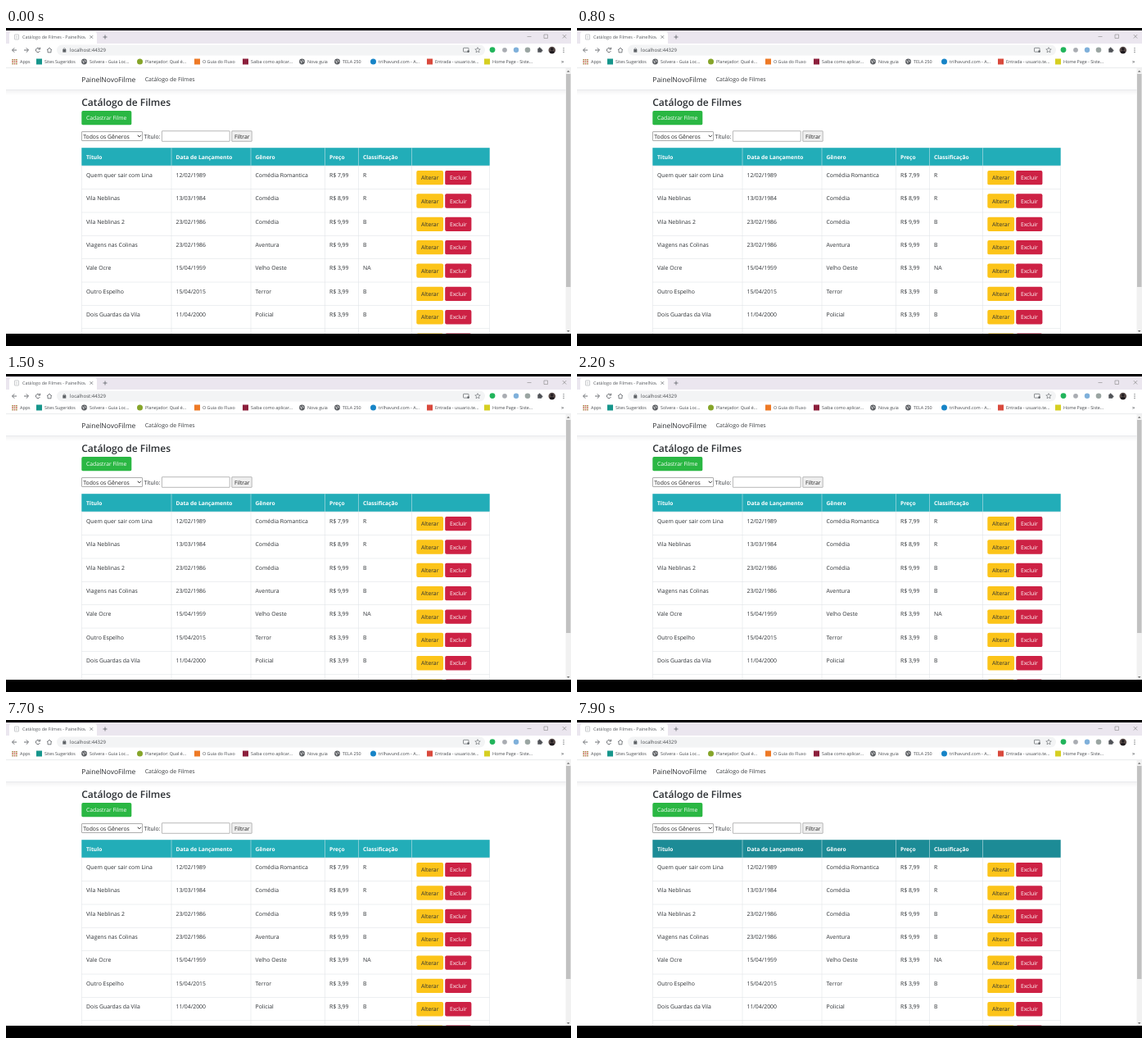
Animation of 690x388 px, one loop 8 s. Source, as an HTML page with a canvas:

```html
<!DOCTYPE html>
<html lang="pt-BR">
<head>
<meta charset="utf-8">
<title>Catálogo de Filmes</title>
<style>
html, body { margin: 0; width: 100%; height: 100%; overflow: hidden; background: #000; }
canvas { display: block; width: 690px; height: 388px; }
</style>
</head>
<body>
<canvas id="stage"></canvas>
<script>
const W = 690, H = 388, LOOP = 8000, DIM_AT = 7900;
const canvas = document.getElementById('stage');
const ctx = canvas.getContext('2d');
const ratio = window.devicePixelRatio || 1;
canvas.width = W * ratio;
canvas.height = H * ratio;
ctx.scale(ratio, ratio);
ctx.textRendering = 'geometricPrecision';

const INK = '#2b2f33', ICON = '#5f6367', BORDER = '#e1e4e8', FIELD = '#a6a6a6';
const COLUMNS = [92.5, 202, 299, 389.5, 430.5, 495.5, 590.5];
const HEADINGS = ['Título', 'Data de Lançamento', 'Gênero', 'Preço', 'Classificação'];
const ROW_TOP = 168, ROW_H = 28.35, PAGE_TOP = 3, PAGE_END = 373;
const FILMS = [
  ['Quem quer sair com Lina', '12/02/1989', 'Comédia Romantica', 'R$ 7,99', 'R'],
  ['Vila Neblinas', '13/03/1984', 'Comédia', 'R$ 8,99', 'R'],
  ['Vila Neblinas 2', '23/02/1986', 'Comédia', 'R$ 9,99', 'B'],
  ['Viagens nas Colinas', '23/02/1986', 'Aventura', 'R$ 9,99', 'B'],
  ['Vale Ocre', '15/04/1959', 'Velho Oeste', 'R$ 3,99', 'NA'],
  ['Outro Espelho', '15/04/2015', 'Terror', 'R$ 3,99', 'B'],
  ['Dois Guardas da Vila', '11/04/2000', 'Policial', 'R$ 3,99', 'B']
];
// x of icon, label, icon kind, icon colour
const BOOKMARKS = [
  [7, 'Apps', 'grid'],
  [37, 'Sites Sugeridos', 'square', '#16968c'],
  [92, 'Solvera - Guia Loc...', 'globe'],
  [160, 'Planejador: Qual é...', 'circle', '#86a52a'],
  [230, 'O Guia do Fluxo', 'square', '#ee7a26'],
  [289, 'Saiba como aplicar...', 'square', '#8c1f3c'],
  [358, 'Nova guia', 'globe'],
  [401, 'TELA 250', 'globe'],
  [445, 'trilhavund.com - A...', 'circle', '#1784c7'],
  [514, 'Entrada - usuario.te...', 'square', '#d94a3d'],
  [584, 'Home Page - Siste...', 'square', '#d6cf22']
];

function rect(x, y, w, h, color) {
  ctx.fillStyle = color;
  ctx.fillRect(x, y, w, h);
}

function round(x, y, w, h, r, fill, stroke, width = 0.7) {
  ctx.beginPath();
  ctx.roundRect(x, y, w, h, r);
  if (fill) { ctx.fillStyle = fill; ctx.fill(); }
  if (stroke) { ctx.strokeStyle = stroke; ctx.lineWidth = width; ctx.stroke(); }
}

function disc(x, y, r, color) {
  ctx.beginPath();
  ctx.arc(x, y, r, 0, Math.PI * 2);
  ctx.fillStyle = color;
  ctx.fill();
}

function line(points, color = ICON, width = 0.9) {
  ctx.beginPath();
  points.forEach(([x, y], i) => i ? ctx.lineTo(x, y) : ctx.moveTo(x, y));
  ctx.strokeStyle = color;
  ctx.lineWidth = width;
  ctx.stroke();
}

function arc(x, y, r, from, to, color = ICON, width = 0.9) {
  ctx.beginPath();
  ctx.arc(x, y, r, from, to);
  ctx.strokeStyle = color;
  ctx.lineWidth = width;
  ctx.stroke();
}

function text(str, x, y, size = 6.87, color = INK, weight = 400) {
  ctx.font = `${weight} ${size}px "Open Sans", "Noto Sans", sans-serif`;
  ctx.fillStyle = color;
  ctx.fillText(str, x, y);
}

function cross(x, y, r, color = ICON) {
  line([[x - r, y - r], [x + r, y + r]], color, 0.7);
  line([[x + r, y - r], [x - r, y + r]], color, 0.7);
}

function star(x, y, r) {
  const points = [];
  for (let i = 0; i <= 10; i++) {
    const a = i * Math.PI / 5 - Math.PI / 2, d = i % 2 ? r * 0.45 : r;
    points.push([x + d * Math.cos(a), y + d * Math.sin(a)]);
  }
  line(points, ICON, 0.6);
}

function tabStrip() {
  rect(0, PAGE_TOP, W, 17, '#ebe6ef');
  round(4, 4, 107, 18, [4, 4, 0, 0], '#fff');
  round(10.5, 8, 5, 6, 0.4, '#fff', '#a5a8ad', 0.6);
  line([[11.8, 10.2], [14.2, 10.2]], '#a5a8ad', 0.5);
  line([[11.8, 12], [14.2, 12]], '#a5a8ad', 0.5);
  ctx.save();
  ctx.beginPath();
  ctx.rect(19, 4, 78, 16);
  ctx.clip();
  text('Catálogo de Filmes - PainelNovo', 20, 13, 5.45, '#55585d');
  ctx.restore();
  cross(104.3, 11, 1.8);
  line([[118.5, 11], [123.5, 11]], ICON, 0.8);
  line([[121, 8.5], [121, 13.5]], ICON, 0.8);
  line([[636.5, 10.5], [641.5, 10.5]], '#888', 0.6);
  round(657, 8, 4.5, 4.5, 0, null, '#888', 0.6);
  cross(682, 10.3, 2.2, '#888');
}

function navIcons() {
  line([[13, 27], [7.8, 27]]);
  line([[10.2, 24.3], [7.5, 27], [10.2, 29.7]]);
  line([[22, 27], [27.2, 27]]);
  line([[24.8, 24.3], [27.5, 27], [24.8, 29.7]]);
  arc(39, 27, 2.6, 0.4, 5.5);
  line([[41.6, 23.7], [41.6, 26], [39.3, 26]]);
  line([[50, 27], [53, 24.2], [56, 27]]);
  line([[51, 26.5], [51, 29.8], [55, 29.8], [55, 26.5]], ICON, 0.8);
}

function toolbar() {
  rect(0, 19, W, 30, '#fff');
  navIcons();
  round(62, 20.5, 523, 13, 6.5, '#f3f4f5');
  rect(69.3, 26, 4, 3.6, ICON);
  arc(71.3, 26, 1.3, Math.PI, 0, ICON, 0.7);
  text('localhost:44329', 78, 29, 6, '#45484c');
  round(558.5, 24.3, 6.5, 4.8, 0.6, null, ICON, 0.7);
  disc(564.6, 28.6, 1.3, ICON);
  star(576, 27, 3.4);
  disc(594, 26.6, 3.4, '#21b45b');
  disc(609, 26.8, 2.9, '#a9acb2');
  disc(623, 26.8, 3.2, '#7fb0da');
  disc(637, 26.8, 3.3, '#9aa5a2');
  round(649.3, 25, 4.8, 4.8, 0.6, '#505358');
  disc(651.6, 24.8, 1.2, '#505358');
  disc(654.2, 27.4, 1.2, '#505358');
  avatar();
  for (const y of [24.6, 27, 29.4]) disc(681, y, 0.65, ICON);
}

function avatar() {
  ctx.save();
  ctx.beginPath();
  ctx.arc(666.8, 27, 4.3, 0, Math.PI * 2);
  ctx.clip();
  rect(662, 22, 10, 10, '#574a48');
  disc(666.8, 25.8, 1.8, '#201c20');
  disc(666.8, 31, 3.2, '#201c20');
  ctx.restore();
}

function bookmarkIcon(kind, x, color) {
  const cx = x + 3.5, cy = 41;
  if (kind === 'grid') {
    for (let i = 0; i < 9; i++)
      rect(x + 0.3 + (i % 3) * 2.4, 38 + Math.floor(i / 3) * 2.4, 1.6, 1.6, i % 2 ? '#c75a48' : '#a08a45');
  } else if (kind === 'globe') {
    disc(cx, cy, 3.4, '#5a5d61');
    line([[x + 1.2, 40], [x + 3.2, 41], [x + 2.6, 43]], '#fff', 0.8);
    line([[x + 4, 38.7], [x + 4.4, 40.2], [x + 6, 41]], '#fff', 0.7);
  } else if (kind === 'circle') {
    disc(cx, cy, 3.5, color);
  } else {
    rect(x, 37.5, 7, 7, color);
  }
}

function bookmarks() {
  for (const [x, label, kind, color] of BOOKMARKS) {
    bookmarkIcon(kind, x, color);
    text(label, x + 10, 43, 5.35, '#45484c');
  }
  text('»', 678, 43, 6.5, '#45484c');
  rect(0, 48.5, W, 0.6, '#dadce0');
}

function pageTop() {
  const shade = ctx.createLinearGradient(0, 75, 0, 82);
  shade.addColorStop(0, '#f1f1f2');
  shade.addColorStop(1, '#fff');
  ctx.fillStyle = shade;
  ctx.fillRect(0, 75, 684, 7);
  rect(0, 75, 684, 0.6, '#e4e6e9');
  text('PainelNovoFilme', 92.3, 66, 8.48, '#2b2d30');
  text('Catálogo de Filmes', 169.7, 65.3, 6.95, '#3a3d40');
  text('Catálogo de Filmes', 92.2, 95, 12, INK, 600);
  button(92.3, 101, 61, 17.3, 'Cadastrar Filme', '#2ab743', '#fff', 6.75);
}

function button(x, y, w, h, label, fill, ink, size = 6.8) {
  round(x, y, w, h, 1.9, fill);
  text(label, x + 5.7, y + 11.3, size, ink);
}

function filterBar() {
  round(92.5, 126.5, 74, 11, 0.5, '#fff', '#8a8a8a', 0.7);
  text('Todos os Gêneros', 94.3, 134.6, 6.8, '#222');
  line([[160.8, 130.8], [162.8, 132.8], [164.8, 130.8]], '#222', 1);
  text('Título:', 168.5, 134.8);
  round(190.4, 125.7, 82.8, 12.6, 0.3, '#fff', FIELD, 0.8);
  round(275.8, 125.7, 24.4, 12.6, 0.3, '#efefef', FIELD, 0.8);
  text('Filtrar', 279, 134.6, 6.8, '#222');
}

function tableHead(dimmed) {
  rect(92.3, 146.2, 498.4, 21.6, dimmed ? '#1c8b96' : '#22adb8');
  COLUMNS.slice(1, 6).forEach(x => rect(x - 0.3, 146.2, 0.6, 21.6, '#c3e2e6'));
  HEADINGS.forEach((label, i) => text(label, COLUMNS[i] + 5.5, 159.6, 6.67, '#fff', 700));
}

function tableBody() {
  COLUMNS.forEach(x => rect(x - 0.3, ROW_TOP, 0.6, PAGE_END - ROW_TOP, BORDER));
  for (let i = 0; i <= FILMS.length; i++) {
    const y = ROW_TOP + i * ROW_H;
    rect(92.3, y, 498.4, 0.6, BORDER);
    (FILMS[i] || []).forEach((cell, c) => text(cell, COLUMNS[c] + 5.5, y + 14));
    button(501.3, y + 6, 32.8, 17.3, 'Alterar', '#fcc419', INK);
    button(536.2, y + 6, 32.2, 17.3, 'Excluir', '#cd2144', '#fff');
  }
}

function triangle(x, y, d) {
  ctx.beginPath();
  ctx.moveTo(x - 1.8, y + d);
  ctx.lineTo(x + 1.8, y + d);
  ctx.lineTo(x, y - d);
  ctx.fillStyle = '#707070';
  ctx.fill();
}

function scrollbar() {
  rect(683.5, 49, 6.5, PAGE_END - 49, '#f1f1f1');
  rect(684, 56, 5.5, 260, '#c1c1c1');
  triangle(686.7, 52.8, 1);
  triangle(686.7, 370, -1);
}

function draw(time) {
  rect(0, 0, W, H, '#000');
  rect(0, PAGE_TOP, W, PAGE_END - PAGE_TOP, '#fff');
  tabStrip();
  toolbar();
  bookmarks();
  pageTop();
  filterBar();
  tableBody();
  tableHead(time >= DIM_AT);
  scrollbar();
  rect(0, PAGE_END, W, H - PAGE_END, '#000');
}

function tick() {
  draw(performance.now() % LOOP);
  requestAnimationFrame(tick);
}
tick();
</script>
</body>
</html>
```
